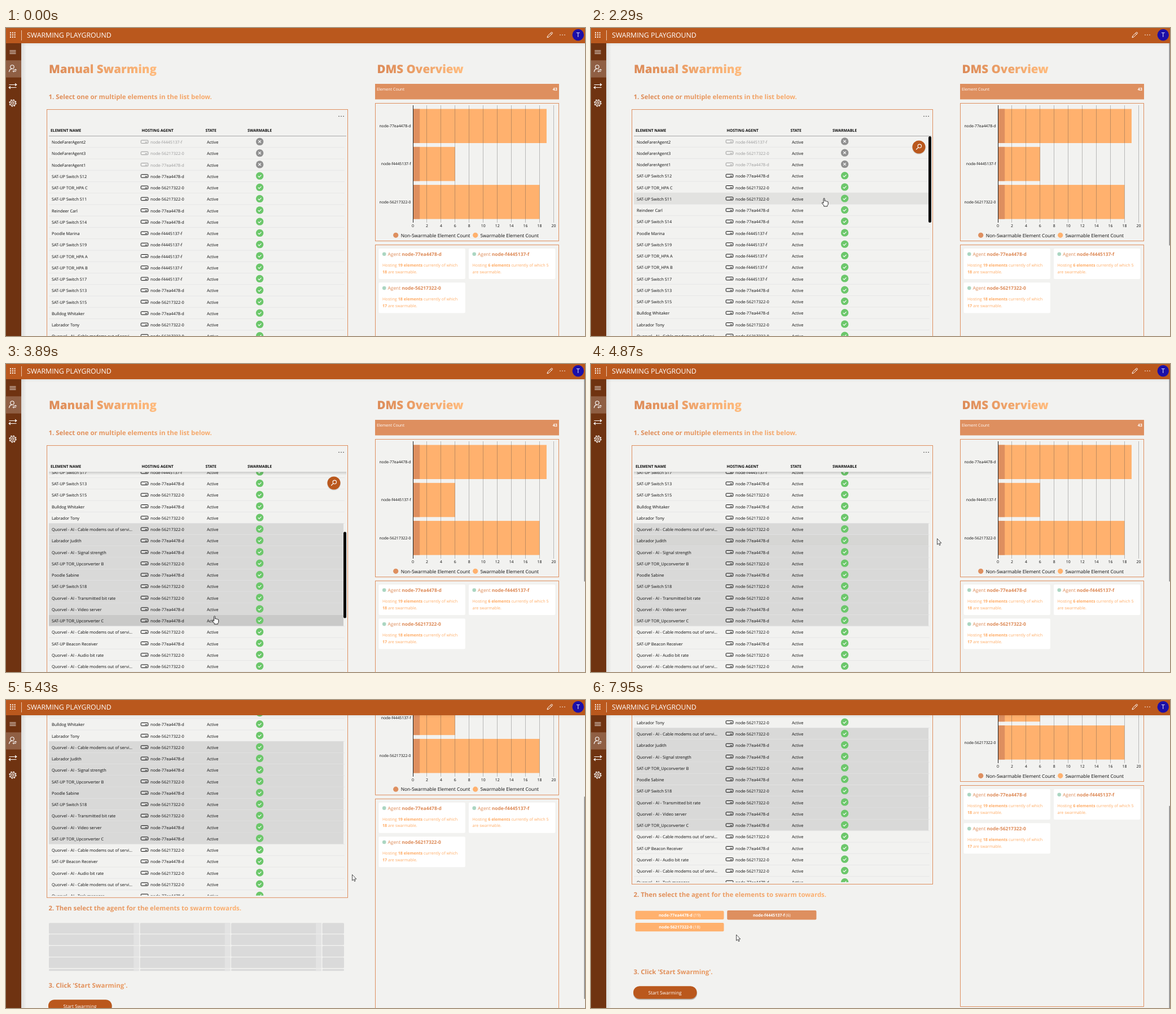
An HTML page for the animation above (8000 ms loop, 1026x546 px).

```html
<!DOCTYPE html>
<html lang="en">
<head>
<meta charset="utf-8">
<title>Swarming Playground</title>
<style>
html, body { margin: 0; width: 100%; height: 100%; overflow: hidden; background: #f2f2f0; }
svg { display: block; width: 100vw; height: 100vh; font-family: "Open Sans", "Noto Sans", sans-serif; text-rendering: geometricPrecision; }
text { white-space: pre; }
</style>
</head>
<body>
<svg id="stage" viewBox="0 0 1026 546" xmlns="http://www.w3.org/2000/svg"></svg>
<script>
const LOOP = 8000, PITCH = 20.25, TOP = 191.2;
const DARK = '#de8f5f', LIGHT = '#ffb16e', BRAND = '#ba581d', INK = '#0c0c0c';
const AGENTS = ['node-77ea4478-d', 'node-f4445137-f', 'node-56217322-0'];
const COUNTS = [19, 6, 18];

// Element name and index of its hosting agent
const ROWS = [
  ['NodeFarerAgent2', 1], ['NodeFarerAgent3', 2], ['NodeFarerAgent1', 0],
  ['SAT-UP Switch S12', 0], ['SAT-UP TOR_HPA C', 2], ['SAT-UP Switch S11', 2],
  ['Reindeer Carl', 0], ['SAT-UP Switch S14', 0], ['Poodle Marina', 1],
  ['SAT-UP Switch S19', 1], ['SAT-UP TOR_HPA A', 1], ['SAT-UP TOR_HPA B', 1],
  ['SAT-UP Switch S17', 1], ['SAT-UP Switch S13', 0], ['SAT-UP Switch S15', 2],
  ['Bulldog Whitaker', 0], ['Labrador Tony', 2], ['Quorvel - AI - Cable modems out of servi...', 2],
  ['Labrador Judith', 0], ['Quorvel - AI - Signal strength', 0], ['SAT-UP TOR_Upconverter B', 2],
  ['Poodle Sabine', 0], ['SAT-UP Switch S18', 2], ['Quorvel - AI - Transmitted bit rate', 2],
  ['Quorvel - AI - Video server', 0], ['SAT-UP TOR_Upconverter C', 0],
  ['Quorvel - AI - Cable modems out of servi...', 2], ['SAT-UP Beacon Receiver', 0],
  ['Quorvel - AI - Audio bit rate', 2], ['Quorvel - AI - Cable modems out of servi...', 2],
  ['Quorvel - AI - Task manager', 0], ['SAT-UP Switch S16', 2]
];

// Keys: [time, value...]
const POINTER = [
  [130, 1018, 250], [900, 760, 310], [1110, 760, 310], [1880, 602, 300], [2120, 440, 283],
  [2240, 413, 301.5], [2500, 413, 301.5], [3280, 411, 297], [3620, 369.5, 446.5], [3960, 369.5, 446.5],
  [4590, 565, 330], [4870, 613.5, 309.5], [5830, 613.5, 309.5], [6300, 210, 381], [6430, 208, 382],
  [6660, 187.5, 417.5], [6800, 187.5, 417.5], [7130, 330, 384], [7220, 328, 384],
  [7550, 277, 386.5], [7810, 277, 386.5], [7950, 257.5, 416]
];
const LIST_SCROLL = [[2500, 0], [2640, 48], [2990, 220], [3140, 252.75]];
const PAGE_SCROLL = [[4940, 0], [5010, 14], [5150, 76], [5430, 209], [5570, 233]];

function at(keys, t) {
  if (t <= keys[0][0]) return keys[0].slice(1);
  for (let i = 1; i < keys.length; i++) {
    const a = keys[i - 1], b = keys[i];
    if (t <= b[0]) {
      const k = (t - a[0]) / (b[0] - a[0]);
      return a.slice(1).map((v, j) => v + (b[j + 1] - v) * k);
    }
  }
  return keys[keys.length - 1].slice(1);
}

const rect = (x, y, w, h, fill, more = '') =>
  `<rect x="${x}" y="${y}" width="${w}" height="${h}" fill="${fill}" ${more}/>`;
const circle = (x, y, r, fill, more = '') => `<circle cx="${x}" cy="${y}" r="${r}" fill="${fill}" ${more}/>`;
const line = (d, stroke, width = 1, more = '') =>
  `<path d="${d}" fill="none" stroke="${stroke}" stroke-width="${width}" ${more}/>`;
const text = (x, y, s, size, fill = INK, more = '') =>
  `<text x="${x}" y="${y}" font-size="${size}" fill="${fill}" ${more}>${s}</text>`;
const bold = 'font-weight="700"', mid = 'text-anchor="middle"';
const dots = (x, y, fill) => [-4, 0, 4].map(d => circle(x + d, y, 0.8, fill)).join('');
const title = (x, s) => text(x, 80, s, 20.5, 'url(#warm)', 'font-weight="800"');
const step = (y, s) => text(75.5, y, s, 11.4, 'url(#wide)', 'font-weight="650"');
const frame = (x, y, w, h) => rect(x, y, w, h, 'none', `stroke="${DARK}"`);

function tableRow([name, agent], i) {
  const locked = i < 3, tint = locked ? '#999' : INK, y = 10.1;
  const mark = locked
    ? 'M447.2 7.4l4.6 4.6M451.8 7.4l-4.6 4.6'
    : 'M446.7 9.9l2 2l3.7 -3.8';
  return `<g transform="translate(0 ${TOP + i * PITCH})">` +
    rect(76, 0, 522, PITCH, '#000', 'class="fill" fill-opacity="0"') +
    line(`M76 ${PITCH - 0.2}H600`, '#e6e6e6') +
    text(81, y + 3.3, name, 7.3) +
    rect(239.2, y - 2.8, 12.6, 5.4, 'none', `rx="1" stroke="${tint}"`) +
    line(`M246.5 ${y + 0.6}h3.5`, tint) +
    text(256, y + 3.3, AGENTS[agent], 7.3, tint) +
    text(356, y + 3.3, 'Active', 7.3) +
    circle(449.6, y - 0.4, 6.7, locked ? '#919191' : '#6cc76b') +
    line(mark, '#fff', 1.2) + '</g>';
}

function table() {
  const heads = [[79, 'ELEMENT NAME'], [240.5, 'HOSTING AGENT'], [353.5, 'STATE'], [428, 'SWARMABLE']];
  return frame(72.5, 144.5, 533, 415) + dots(594, 156.5, '#333') +
    heads.map(([x, s]) => text(x, 183.7, s, 6.9, INK, bold)).join('') +
    `<g clip-path="url(#list)"><g id="rows">${ROWS.map(tableRow).join('')}</g></g>` +
    line('M76 191.5H603', '#a9a9a9', 1, 'id="rule"') +
    rect(76, 191, 527, 6, 'url(#drop)', 'id="shade"') +
    '<g id="tools">' + rect(598, 192, 5, 153, '#0a0a0a', 'id="thumb" rx="2.5"') +
    circle(581, 212, 12, '#000', 'opacity=".12"') + circle(581, 211, 11.5, BRAND) +
    circle(582.3, 209.3, 3.2, 'none', 'stroke="#fff" stroke-width="1.1"') +
    line('M580 211.7l-3.8 3.8', '#fff', 1.2) + '</g>';
}

function chart() {
  const unit = 12.47, x0 = 721;
  let s = frame(654.5, 133.5, 325, 244);
  COUNTS.forEach((n, i) => {
    const y = 143.5 + i * 67.3;
    s += rect(x0, y, n * unit, 60.5, LIGHT) + rect(x0, y, 12.2, 60.5, DARK) +
      text(717.5, y + 32.5, AGENTS[i], 6.85, INK, 'text-anchor="end"');
  });
  for (let v = 0; v <= 20; v += 2) {
    const x = x0 + v * unit;
    s += line(`M${Math.floor(x) + 0.5} 137V345`, v ? '#444' : '#222', 1, v ? 'opacity=".33"' : '') +
      text(x, 353, v, 6.9, INK, mid);
  }
  return s + circle(690.7, 367.3, 4.6, DARK) + text(699.7, 370.5, 'Non-Swarmable Element Count', 8.4) +
    circle(831.7, 367.3, 4.6, LIGHT) + text(840.5, 370.5, 'Swarmable Element Count', 8.4);
}

function card(i) {
  const x = 660.5 + (i % 2) * 159.5, y = 391 + (i >> 1) * 60.3, n = COUNTS[i];
  const wrap = n < 10;
  return rect(x, y, 153.3, 54, '#fff', 'rx="2"') + circle(x + 9.7, y + 9.8, 3.3, '#abd6c2') +
    text(x + 16, y + 13, `Agent <tspan ${bold}>${AGENTS[i]}</tspan>`, 8.4, '#dd8a57') +
    text(x + 6.5, y + 32, `Hosting <tspan ${bold}>${n} elements</tspan> currently of which${wrap ? ' ' + (n - 1) : ''}`, 7.2, '#ffac66') +
    text(x + 6.5, y + 43.5, wrap ? 'are swarmable.' : `<tspan ${bold}>${n - 1}</tspan> are swarmable.`, 7.2, '#ffac66');
}

function skeleton() {
  let s = '';
  for (let r = 0; r < 5; r++)
    for (let c = 0; c < 4; c++) {
      const x = 76 + c * 161.5, y = 604.3 + r * 20.4, w = c < 3 ? 160 : 599 - x, h = r < 4 ? 19 : 3.5;
      s += rect(x, y, w, h, '#dadada', 'rx="1.5"') +
        rect(x, y, w, h, '#e3e3e3', `class="glow" data-x="${x}" data-w="${w}"`);
    }
  return s;
}

const choiceBox = (i, pad = 0) => ({
  x: 78.5 + (i % 2) * 163.3 - pad, y: 606.7 + (i >> 1) * 21.2 - pad,
  width: 157 + 2 * pad, height: 15.3 + 2 * pad
});

function choice(i) {
  const b = choiceBox(i);
  return rect(b.x, b.y, b.width, b.height, LIGHT, 'class="choice" rx="2"') +
    text(b.x + 78.5, b.y + 10.4, `<tspan ${bold}>${AGENTS[i]}</tspan> (${COUNTS[i]})`, 7.15, '#fff', mid);
}

function chrome() {
  let s = rect(27, 27, 9, 519, 'url(#side)') + rect(27, 27, 999, 5, 'url(#drop)', 'opacity=".35"') +
    rect(1024.5, 27, 1.5, 358.5, '#858585', 'id="bar"') +
    rect(0, 27, 27, 519, '#6f3311') + rect(0, 57.3, 27, 30.4, '#8f5f44') +
    rect(0, 0, 1026, 27, BRAND);
  for (let i = 0; i < 9; i++) s += rect(7 + (i % 3) * 3.8, 7.5 + (i / 3 | 0) * 3.8, 2, 2, '#fff');
  s += line('M27.5 4V22', '#e9c9b4') + text(37, 16.8, 'SWARMING PLAYGROUND', 12.3, '#fff') +
    line('M959 17l.8 -3l6.6 -6.4q1.6 -.6 2.2 1.6l-6.6 6.6zM964.8 9.2l2.2 2.2', '#fff', 1) +
    dots(986, 12.3, '#fff') + circle(1013.8, 12.2, 10.2, '#1c0fa8') + text(1013.8, 16.1, 'T', 11, '#fff', mid) +
    line('M6.5 40H17.5M6.5 42.7H17.5M6.5 45.4H17.5', '#fff', 0.9) +
    circle(11, 69, 3.2, 'none', 'stroke="#fff" stroke-width="1.1"') +
    line('M5.5 78q.5 -5.5 5.5 -5.6M12.5 74.3h5.5l-1.6 -1.4M18 76.8h-5.5l1.6 1.4', '#fff', 1.1) +
    line('M5.5 100.5H18.5l-2.4 -2.2M18.5 105.5H5.5l2.4 2.2M18.5 100.5l-2.4 2.2M5.5 105.5l2.4 -2.2', '#fff', 1.2) +
    circle(12, 133, 2.1, 'none', 'stroke="#fff" stroke-width="1.1"') +
    circle(12, 133, 4.8, 'none', 'stroke="#fff" stroke-width="1.1"') +
    circle(12, 133, 6, 'none', 'stroke="#fff" stroke-width="1.3" stroke-dasharray="2.3 2.41"');
  return s;
}

const stop = (o, c, a = 1) => `<stop offset="${o}" stop-color="${c}" stop-opacity="${a}"/>`;
const stage = document.getElementById('stage');
stage.innerHTML = `<defs>
  <linearGradient id="warm">${stop(0, '#dc8a57')}${stop(1, '#ffbb7d')}</linearGradient>
  <linearGradient id="wide" gradientUnits="userSpaceOnUse" x1="75" x2="430">${stop(0, '#dc8a57')}${stop(1, '#ffb371')}</linearGradient>
  <linearGradient id="side">${stop(0, '#000', 0.09)}${stop(1, '#000', 0)}</linearGradient>
  <linearGradient id="drop" x2="0" y2="1">${stop(0, '#000', 0.16)}${stop(1, '#000', 0)}</linearGradient>
  <clipPath id="list">${rect(73, 191.5, 533, 364.5, '#000')}</clipPath></defs>` +
  rect(0, 0, 1026, 546, '#f2f2f0') +
  '<g id="page">' + title(76, 'Manual Swarming') + title(657.5, 'DMS Overview') +
  step(126, '1. Select one or multiple elements in the list below.') + table() +
  rect(654, 99, 326, 27.5, DARK) + text(657, 110.8, 'Element Count', 7.1, '#fff') +
  text(977, 110.8, '43', 7.3, '#fff', bold + ' text-anchor="end"') + chart() +
  frame(654.5, 384.5, 325, 392) + [0, 1, 2].map(card).join('') +
  step(581.8, '2. Then select the agent for the elements to swarm towards.') +
  `<g id="wait">${skeleton()}</g><g id="choices">${[0, 1, 2].map(choice).join('')}</g>` +
  step(718.8, "3. Click 'Start Swarming'.") +
  rect(75, 742, 113, 22.5, '#000', 'rx="11" opacity=".25"') + rect(75, 740.3, 112.5, 22.5, BRAND, 'rx="11"') +
  text(131, 754.7, 'Start Swarming', 8.3, '#fff', mid) + '</g>' + chrome() +
  `<g id="pointer"><path id="arrow" d="M0 0V10.6L2.4 8.4L4 12L5.6 11.3L4.1 7.8H7.3Z" fill="#fff" stroke="#222" stroke-width=".8"/>
  <path id="hand" d="M-1 1Q0 -.6 1.1 1V5.3Q2.6 4.3 3.3 5.6Q4.9 4.9 5.4 6.2Q7.2 5.8 7.2 7.6V10.5Q7 12.3 5.8 13.2V14.6H-.3V13.2L-3.9 8.8Q-3.9 7 -1 8.8Z" fill="#fff" stroke="#111" stroke-width=".9" stroke-linejoin="round"/></g>`;

const $ = id => document.getElementById(id);
const all = sel => [...stage.querySelectorAll(sel)];
const set = (el, props) => { for (const k in props) el.setAttribute(k, props[k]); };
const show = (el, on) => { el.style.display = on ? '' : 'none'; };
const fills = all('.fill'), glows = all('.glow'), choices = all('.choice');

function hovered(t) {
  const [x, y] = at(POINTER, t);
  if (t > 4940 || x < 76 || x > 598 || y < 192 || y > 556) return -1;
  return Math.floor((y - TOP + at(LIST_SCROLL, t)[0]) / PITCH);
}

function draw(t) {
  const [x, y] = at(POINTER, t), [list] = at(LIST_SCROLL, t), [page] = at(PAGE_SCROLL, t);
  const inTable = t >= 1850 && t < 4800, loaded = t >= 5540;

  set($('page'), { transform: `translate(0 ${-page})` });
  set($('rows'), { transform: `translate(0 ${(t < 1850 ? 0.5 : 0) - list})` });
  set($('thumb'), { y: 192 + list * 0.417 });
  set($('bar'), { y: 27 + page * 0.69 });
  show($('bar'), t >= 130);
  show($('tools'), inTable);
  show($('rule'), list < 1);
  show($('shade'), list >= 1);

  // Hover fades out over the last few moments
  const trail = [0, 35, 70, 105].map(d => hovered(t - d));
  fills.forEach((el, i) => {
    const picked = i === 17 ? t >= 3280 : i > 17 && i < 26 && t >= 3820;
    const glow = trail.filter(r => r === i).length / trail.length;
    set(el, { 'fill-opacity': (picked ? 0.103 : 0) + glow * 0.065 });
  });

  show($('wait'), !loaded);
  show($('choices'), loaded);
  const split = Math.min(160, Math.max(0, 80 + (t - 5150) * 0.25));
  glows.forEach(el => {
    const { x: left, w } = el.dataset;
    set(el, { x: +left + split, width: Math.max(0, w - split) });
  });

  const active = t < 6380 ? -1 : t < 7170 ? 0 : 1;
  choices.forEach((el, i) => {
    const on = i === active;
    set(el, { ...choiceBox(i, on ? 0.6 : 0), fill: on ? DARK : LIGHT });
  });

  const onChoice = loaded && ((y > 374 && y < 389 && x > 78 && x < 399) || (y > 395 && y < 410 && x > 78 && x < 236));
  const hand = hovered(t) >= 0 || onChoice;
  set($('pointer'), { transform: `translate(${x} ${y})` });
  show($('pointer'), t >= 130);
  show($('arrow'), !hand);
  show($('hand'), hand);
}

const start = performance.now();
function tick() {
  draw((performance.now() - start) % LOOP);
  requestAnimationFrame(tick);
}
tick();
</script>
</body>
</html>
```
